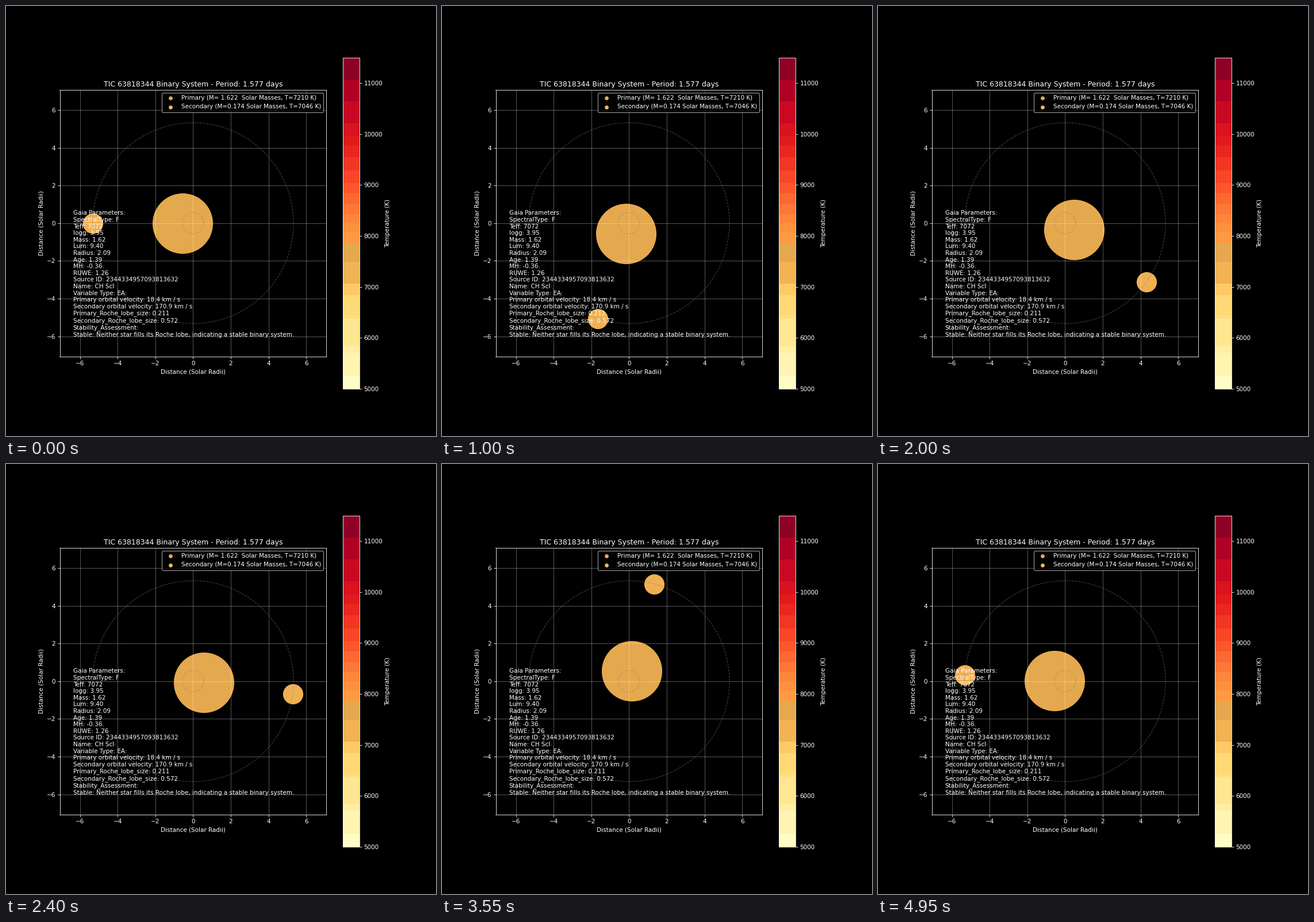
Recreate the animation shown at these times as a matplotlib script. Size 748 px wide and 748 px high, loop 5000 ms.

```python
import numpy as np
import matplotlib.pyplot as plt
from matplotlib.animation import FuncAnimation
from matplotlib.cm import ScalarMappable
from matplotlib.colors import BoundaryNorm, ListedColormap

FRAMES = 100
R_PRIMARY, R_SECONDARY = 0.573, 5.325   # orbit radii
MASS_RATIO = 9.32
LIMIT = 7.07

INFO = """Gaia Parameters:
SpectralType: F
Teff: 7072
logg: 3.95
Mass: 1.62
Lum: 9.40
Radius: 2.09
Age: 1.39
MH: -0.36
RUWE: 1.26
Source ID: 2344334957093813632
Name: CH Scl
Variable Type: EA:
Primary orbital velocity: 18.4 km / s
Secondary orbital velocity: 170.9 km / s
Primary_Roche_lobe_size: 0.211
Secondary_Roche_lobe_size: 0.572
Stability_Assessment:
Stable: Neither star fills its Roche lobe, indicating a stable binary system.
"""

# Heights of the colour bands above the bar's foot, of 576 in all
BAND_EDGES = [0, 23, 63, 75, 122, 128, 163, 183, 221, 253, 272, 288, 304,
              321, 340, 358, 380, 403, 423, 439, 462, 500, 538, 576]
BAND_TINTS = {7: "#f2b353", 8: "#e5a84e"}

plt.style.use("dark_background")
plt.rcParams["font.family"] = "DejaVu Sans"
fig, ax = plt.subplots(figsize=(10, 10), dpi=74.8)
ax.set_aspect("equal")
ax.set_xlim(-LIMIT, LIMIT)
ax.set_ylim(-LIMIT, LIMIT)
ax.grid(True, alpha=0.4, color="white")
ax.set_xlabel("Distance (Solar Radii)")
ax.set_ylabel("Distance (Solar Radii)")
ax.set_title("TIC 63818344 Binary System - Period: 1.577 days")


def add_star(size, alpha):
    return ax.scatter([0], [0], s=size, color="#febb57", alpha=alpha)


def add_orbit(radius):
    a = np.linspace(0, 2 * np.pi, 200)
    ax.plot(radius * np.cos(a), radius * np.sin(a), "--",
            color="gray", lw=1, alpha=0.5)


def add_key(color, alpha, label):
    ax.scatter([], [], s=30, color=color, alpha=alpha, label=label)


def add_colorbar():
    edges = np.array(BAND_EDGES) / 576
    mids = (edges[:-1] + edges[1:]) / 2
    colors = list(plt.get_cmap("YlOrRd")(mids))
    for i, tint in BAND_TINTS.items():
        colors[i] = tint
    cmap = ListedColormap(colors)
    norm = BoundaryNorm(5000 + 6500 * edges, cmap.N)
    bar = fig.colorbar(ScalarMappable(norm, cmap), ax=ax,
                       spacing="proportional", ticks=range(5000, 11001, 1000))
    bar.minorticks_off()
    bar.set_label("Temperature (K)")


primary = add_star(10000, 0.9)
secondary = add_star(10000 / MASS_RATIO, 0.95)
add_orbit(R_PRIMARY)
add_orbit(R_SECONDARY)
add_key("#febb57", 0.9, "Primary (M= 1.622  Solar Masses, T=7210 K)")
add_key("#fec560", 0.95, "Secondary (M=0.174 Solar Masses, T=7046 K)")
ax.legend(loc="upper right")
add_colorbar()
ax.text(0.05, 0.05, INFO, transform=ax.transAxes, fontsize=10, color="white")


def update(i):
    angle = np.pi + 2 * np.pi * i / FRAMES
    heading = np.array([np.cos(angle), np.sin(angle)])
    primary.set_offsets([R_PRIMARY * heading])
    secondary.set_offsets([R_SECONDARY * heading])
    return primary, secondary


anim = FuncAnimation(fig, update, frames=FRAMES, interval=50,
                     repeat=True, repeat_delay=0)
plt.show()
```
